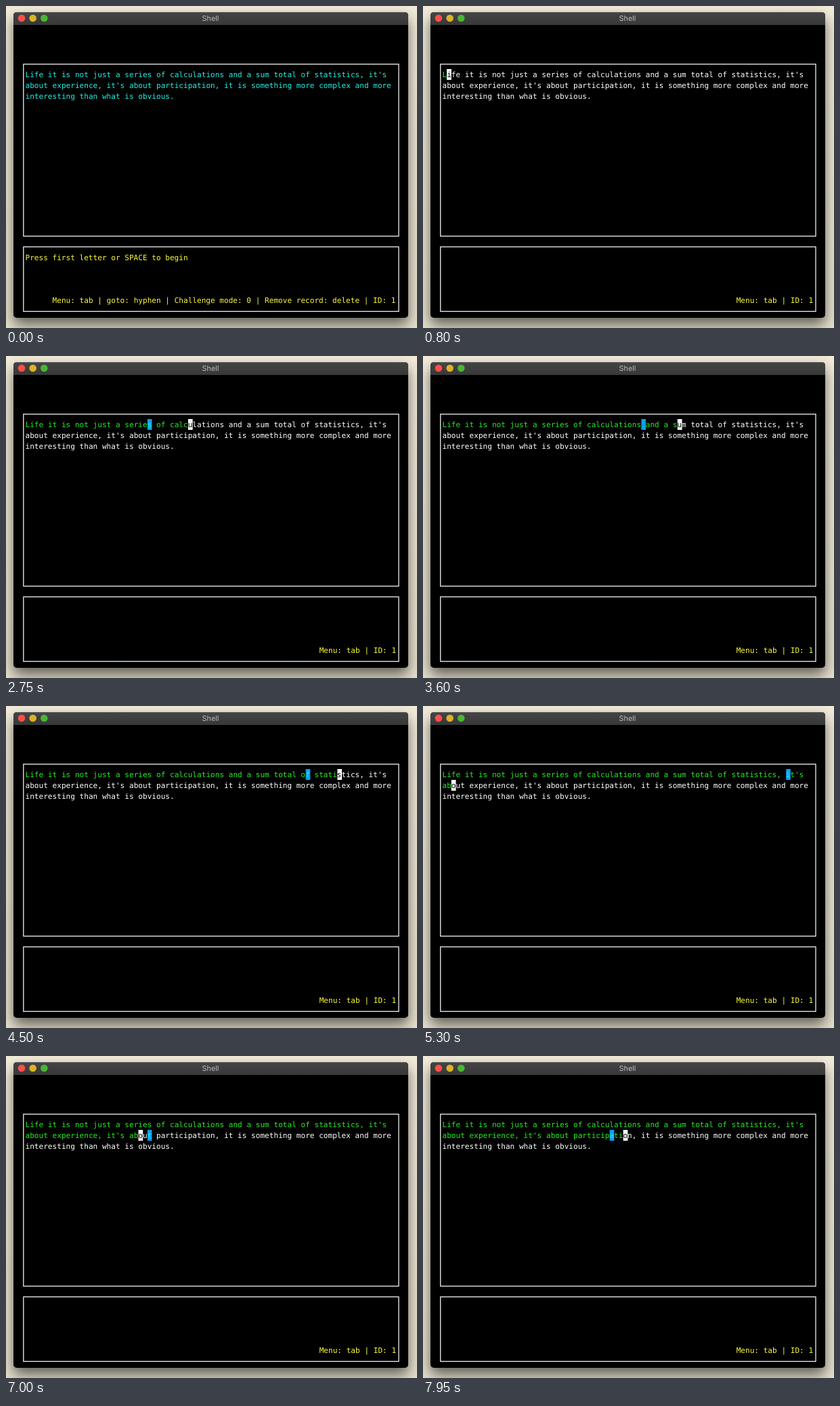
Animation of 607 by 475 pixels, one loop 8000 ms. Source, as an HTML page:

```html
<!DOCTYPE html>
<html lang="en">
<head>
<meta charset="utf-8">
<title>Shell</title>
<style>
  html, body { margin: 0; width: 100%; height: 100%; overflow: hidden; background: #eae4d3; }
  svg { display: block; width: 100%; height: 100%; }
  text { text-rendering: geometricPrecision; white-space: pre; }
  .mono { font: 11.095px "DejaVu Sans Mono", monospace; }
  .title { font: 10.8px Inter, sans-serif; fill: #b9b9b9; text-anchor: middle; }
  .status { fill: #fbfa3a; }
  .frame { fill: none; stroke: #efefef; stroke-width: 1.3; }
</style>
</head>
<body>
<svg viewBox="0 0 607 475" preserveAspectRatio="none">
  <defs>
    <linearGradient id="desk" x1="0" y1="0" x2="0" y2="1">
      <stop offset="0" stop-color="#f1ead9"/>
      <stop offset="1" stop-color="#e6e0cd"/>
    </linearGradient>
    <linearGradient id="bar" x1="0" y1="0" x2="0" y2="1">
      <stop offset="0" stop-color="#444"/>
      <stop offset="1" stop-color="#383838"/>
    </linearGradient>
    <filter id="blur" x="-20%" y="-20%" width="140%" height="140%">
      <feGaussianBlur stdDeviation="10"/>
    </filter>
  </defs>
  <rect width="607" height="475" fill="url(#desk)"/>
  <rect x="11" y="19" width="583" height="451" rx="6" opacity=".58" filter="url(#blur)"/>
  <rect x="11" y="9" width="583" height="451" rx="5"/>
  <path d="M11 28V14a5 5 0 0 1 5-5H589a5 5 0 0 1 5 5V28Z" fill="url(#bar)"/>
  <path d="M14 9.6H591" stroke="#626262" stroke-width=".8"/>
  <circle cx="23" cy="18" r="5.3" fill="#fd4f49"/>
  <circle cx="39.7" cy="18" r="5.3" fill="#dbb32a"/>
  <circle cx="56.3" cy="18" r="5.3" fill="#4ab535"/>
  <text class="title" x="302" y="22">Shell</text>
  <rect class="frame" x="25.8" y="85.8" width="554.2" height="253.7"/>
  <rect class="frame" x="25.8" y="355.3" width="554.2" height="95.2"/>
  <rect id="pacer" width="6.68" height="16" fill="#0c9fea"/>
  <rect id="cursor" width="6.68" height="16" fill="#fff"/>
  <g id="quote" class="mono"></g>
  <text id="prompt" class="mono status" x="28.5" y="374.5">Press first letter or SPACE to begin</text>
  <text id="menu" class="mono status" y="438"></text>
</svg>
<script>
const LOOP = 8000, START = 750;
const CELL = 6.68, LEFT = 28.5, TOP = 93, ROW = 16, COLS = 82;
const LINES = [
  "Life it is not just a series of calculations and a sum total of statistics, it's ",
  "about experience, it's about participation, it is something more complex and more ",
  "interesting than what is obvious."
];
const IDLE_MENU = "Menu: tab | goto: hyphen | Challenge mode: 0 | Remove record: delete | ID: 1";
const BUSY_MENU = "Menu: tab | ID: 1";

// [time, characters reached]
const TYPED = [[START, 0.5], [1700, 15.5], [2750, 36.5], [4500, 69.5], [6000, 95.5], [7000, 106.5], [7950, 121.5], [8000, 121.9]];
const PACED = [[START, 0.5], [1700, 18.5], [2750, 27.5], [4500, 62.5], [6000, 89.5], [7000, 108.5], [7950, 118.5], [8000, 118.9]];

const $ = id => document.getElementById(id);
const make = (tag, parent) => parent.appendChild(document.createElementNS("http://www.w3.org/2000/svg", tag));

const chars = [];
LINES.forEach((line, row) => {
  const text = make("text", $("quote"));
  text.setAttribute("x", LEFT);
  text.setAttribute("y", TOP + row * ROW + 12);
  [...line].forEach((letter, col) => {
    const node = make("tspan", text);
    node.textContent = letter;
    chars.push({ node, row, col });
  });
});

function reached(keys, t) {
  let i = 1;
  while (i < keys.length - 1 && keys[i][0] < t) i++;
  const [t0, a] = keys[i - 1], [t1, b] = keys[i];
  return Math.floor(a + (b - a) * (t - t0) / (t1 - t0));
}

function place(block, index, on) {
  const { row, col } = chars[Math.max(0, index)];
  block.setAttribute("x", LEFT + col * CELL);
  block.setAttribute("y", TOP + row * ROW);
  block.setAttribute("visibility", on ? "visible" : "hidden");
}

function render(t) {
  const busy = t >= START;
  const typed = busy ? reached(TYPED, t) : -1;
  const paced = busy ? reached(PACED, t) : -1;
  place($("pacer"), paced, busy);
  place($("cursor"), typed, busy);
  chars.forEach(({ node }, i) => {
    const color = !busy ? "#24eee2"
      : i === typed ? "#000"
      : i === paced ? "#38e4ee"
      : i < typed ? "#22ee20" : "#fff";
    node.setAttribute("fill", color);
  });
  const menu = busy ? BUSY_MENU : IDLE_MENU;
  $("menu").textContent = menu;
  $("menu").setAttribute("x", LEFT + (COLS - menu.length) * CELL);
  $("prompt").setAttribute("visibility", busy ? "hidden" : "visible");
}

const begin = performance.now();
function tick() {
  render((performance.now() - begin) % LOOP);
  requestAnimationFrame(tick);
}
tick();
</script>
</body>
</html>
```
